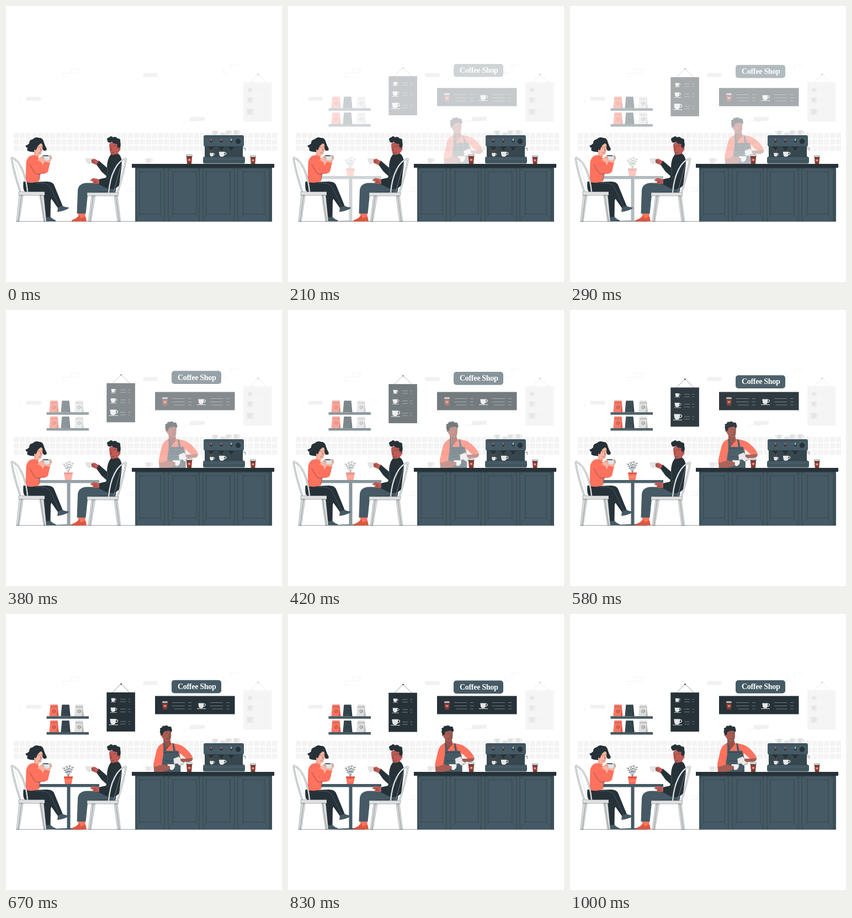
Write an HTML page that moves like this. It is 500 px wide and 500 px high and loops after 1040 ms.

```html
<!DOCTYPE html>
<html lang="en">
<head>
<meta charset="utf-8">
<title>Coffee shop</title>
<style>
html, body { margin: 0; width: 100%; height: 100%; overflow: hidden; background: #fff; }
svg { display: block; width: 100vw; height: 100vh; }
.line { fill: none; stroke: #263238; stroke-width: .5; stroke-linecap: round; stroke-linejoin: round; }
.faint { fill: none; stroke: #ebebeb; stroke-width: .6; }
.dark { fill: #263238; } .slate { fill: #455a64; } .coral { fill: #ff725e; }
.pale { fill: #f4f4f4; } .cup { fill: #e6e6e6; }
.chair { fill: #e0e0e0; stroke: #455a64; stroke-width: .4; stroke-linejoin: round; }
</style>
</head>
<body>
<svg viewBox="0 0 500 500">
  <defs>
    <g id="mug">
      <path d="M-5-4H4L3.3 1.5Q2.5 4-.5 4Q-3.4 4-4.2 1.5Z"/>
      <path d="M3.6-2.8Q7-3.2 6.3-.6Q5.6 1.3 3 1.2" fill="none" stroke="currentColor" stroke-width="1"/>
    </g>
    <g id="takeaway">
      <path d="M-5.2-6H5.2L3.9 8.5H-3.9Z" fill="#7d3b34"/>
      <path d="M-4.7-1.5H4.7L4.2 4H-4.2Z" fill="#a9493d"/>
      <circle cy="1.2" r="1.5" fill="#e8c8bd"/>
      <path d="M-5-8.4H4.7L5.8-5.4H-6Z" fill="#e6e6e6" stroke="#455a64" stroke-width=".5"/>
    </g>
    <g id="bag">
      <path d="M-6.6-21H6.6L7-17L8.6 0H-8.6L-7-17Z"/>
      <path d="M5.6-16.5L8.6 0H4.6Z" fill="#000" opacity=".16"/>
      <path d="M-7-17H7" stroke="#263238" stroke-width=".4"/>
      <circle cy="-9" r="2.7" class="line"/>
      <path d="M-.8-8L.8-10" class="line"/>
    </g>
    <path id="rope" d="M-15.5 15.5L0 0L15.5 15.5" fill="none"/>
  </defs>

  <g id="tiles" class="pale"></g>
  <g fill="#f1f1f1">
    <rect x="37" y="164.500" width="26.500" height="7" rx="2"/>
    <rect x="248.500" y="121.500" width="26" height="7" rx="2"/>
    <rect x="333" y="201" width="27" height="7" rx="2"/>
  </g>
  <path class="faint" d="M130 118V121.500H103.500V128H112M117 121V114H133V118M26.500 176V171H30M406 115V107H422M400 121.500H392.500V114.500H396M322 214V208.500H348M217 336H231V330H220"/>

  <g>
    <use href="#rope" x="457" y="123.500" stroke="#e4e4e4" stroke-width=".7"/>
    <circle cx="457" cy="124" r="1.400" fill="#ccc"/>
    <rect x="430" y="138" width="51.500" height="71.500" fill="#f5f5f5"/>
    <g fill="#e6e6e6" color="#e6e6e6">
      <use href="#mug" transform="translate(442 152.500) scale(.8)"/>
      <use href="#mug" transform="translate(442 170)"/>
      <use href="#mug" transform="translate(442 191.500) scale(1.200)"/>
      <path d="M436 174.500H448V175.300H436ZM434 196H451V197H434Z"/>
    </g>
    <path stroke="#efefef" stroke-width=".6" d="M455 150H465M455 155H465M469 150H472M455 168H465M455 173H465M469 173H472M455 188H465M455 193H465M469 193H472"/>
  </g>

  <path class="line" d="M19 390.300H482" stroke-width=".8"/>

  <g class="fade" data-y="1">
    <use href="#rope" x="208.500" y="126.700" class="line"/>
    <circle cx="208.500" cy="127.200" r="1.200" class="dark"/>
    <rect x="182.300" y="142.200" width="51.600" height="70.900" class="dark"/>
    <g class="cup" color="#e6e6e6">
      <use href="#mug" transform="translate(194.500 156) scale(.8)"/>
      <use href="#mug" transform="translate(194.500 173.800)"/>
      <use href="#mug" transform="translate(194.500 195.300) scale(1.250)"/>
      <path d="M190 159.400H199V160.100H190ZM188.500 178.200H201V179H188.500ZM186.500 200.500H203V201.500H186.500Z"/>
    </g>
    <path stroke="#a5adb0" stroke-width=".6" d="M207 154.500H217M207 159H217M221.500 154.500H225M222 159H225M207 172.500H217M207 177.500H217M221.500 172.500H225M222 177.500H225M207 195H217M207 199.500H217M221.500 195H225M222 199.500H225"/>
  </g>

  <g class="fade">
    <g id="bags"></g>
    <path class="slate" d="M73.500 185.300H150V189.700H73.500ZM73.500 214H150V218.400H73.500Z"/>
    <rect x="270" y="148.500" width="144.500" height="33" class="dark"/>
    <use href="#takeaway" transform="translate(288 165.700) scale(.9)"/>
    <g class="cup" color="#e6e6e6"><use href="#mug" transform="translate(354 166) scale(1.150)"/><path d="M346 171H362V172H346Z"/></g>
    <path stroke="#a5adb0" stroke-width=".6" d="M301 160.500H324M301 166.500H324M304 172H324M330 160.500H336M330 166.500H336M330 172H336M370 160.500H393M370 166.500H393M373 172H393M399 160.500H405M399 166.500H405M399 172H405"/>
  </g>

  <g class="fade" data-y="1">
    <rect x="300" y="120" width="90" height="23.700" rx="5" class="slate"/>
    <text x="345.700" y="136.300" text-anchor="middle" font-family="'Liberation Serif', serif" font-weight="bold" font-size="14" letter-spacing="-.3" fill="#fff">Coffee Shop</text>
  </g>

  <g class="fade" id="barista" data-x="-1">
    <path class="coral" d="M284 234Q276 237 273 246L267 272L270 286H316L315 252L327 263L338 259Q330 246 319 239Q314 236 301 234Z"/>
    <path fill="#95524a" d="M285 223V237L290 246L299 236L297 226Z"/>
    <path fill="#a65d53" d="M281 212Q283 206 292 207L299 211V220Q299 231 293 231Q286 231 282 222Q277 219 281 215Z"/>
    <path class="dark" d="M281 219Q277 213 279.500 210Q277 206 282 206Q283 201 287 203Q291 200 294 204Q300 203 299.500 207Q302 211 299 214Q295 210 291 212Q287 212 285 214L284 219Z"/>
    <path class="line" d="M290 216L292 215.500M296 216H298M295 218L296.500 223L294 223.500M290 226Q293 228 296 226"/>
    <path class="line" d="M283 252L281 268M284 234L289 246L293 241"/>
    <path class="slate" d="M285 234L287 234L290 248H303L301 234L304 235L307 248H312Q313 256 316 262V287H282V264Q285 258 285 248Z"/>
    <path class="line" d="M285 251H312M288 266H309"/>
    <path fill="#a65d53" d="M267 274L283 272L292 275L297 280L291 284L281 286H268Z"/>
    <path class="coral" d="M273 246L267 272L269 277L282 273L285 252Z"/>
    <path fill="#f1f1f1" stroke="#455a64" stroke-width=".4" d="M292 272H306Q307 281 300 283Q293 281 292 272Z"/>
    <path fill="#a65d53" d="M282 276L291 274L297 276L297 281L288 284Z"/>
    <path fill="#e8e8e8" stroke="#455a64" stroke-width=".5" d="M303 262L313 258L322 268L315 275L310 271L304 272Z"/>
    <path fill="#a65d53" d="M316 262L326 262L338 260Q339 267 331 268L320 268L316 266Z"/>
    <path class="line" d="M319 267Q325 269 321 272L317 273"/>
  </g>

  <g id="machine">
    <g fill="#e2e2e2" color="#d8d8d8">
      <use href="#mug" transform="translate(379 230) scale(-1 1)"/><use href="#mug" transform="translate(393 232) scale(.9 .7)"/>
      <use href="#mug" transform="translate(403 229.500)"/><use href="#mug" transform="translate(417 229.500) scale(1.050)"/>
    </g>
    <rect x="360" y="250" width="69" height="25" fill="#37474f"/>
    <rect x="358" y="234" width="73" height="20.500" rx="3" class="slate"/>
    <path class="line" d="M360 237H429M360 254.500H430"/>
    <g id="dials"></g>
    <circle cx="420.500" cy="245.300" r="4.700" class="dark"/>
    <path class="line" d="M428 257.500H433.500V262" stroke-width="1"/>
    <rect x="357" y="273" width="76" height="12.500" rx="3" class="slate"/>
    <path class="line" d="M357.500 281H432M361 273H430"/>
    <g class="cup" color="#e6e6e6"><use href="#mug" transform="translate(373 269.500) scale(.8)"/><use href="#mug" transform="translate(391.500 268.500) scale(1.150)"/></g>
  </g>
  <g fill="#e8e8e8" color="#dcdcdc"><use href="#mug" transform="translate(258 280.500) scale(1.150)"/></g>
  <use href="#takeaway" x="332" y="277.500"/>
  <use href="#takeaway" transform="translate(447.500 278.500) scale(.93)"/>

  <g id="counter">
    <rect x="234" y="292" width="248" height="98.500" class="slate"/>
    <path fill="#37474f" d="M234 293H482V294.500H234Z"/>
    <path fill="#3e515a" d="M477 294H482V390H477Z"/>
    <g id="panels" class="line"></g>
    <rect x="228" y="286" width="258" height="7" class="dark"/>
  </g>

  <g class="fade">
    <path class="slate" d="M110.500 312H116.500V388L139 389V390.500H88V389L110.500 388ZM58.500 308H169V313.500H58.500Z"/>
    <g id="plant" class="line"></g>
    <path class="coral" d="M105 294.500H121L118.500 308H107Z"/>
    <path fill="#d9523f" d="M105 294.500H121L120.500 297.500H105.500Z"/>
    <path class="line" d="M109 302H117" style="stroke:#ffc9c1"/>
  </g>

  <g id="woman">
    <path class="dark" d="M60 330L66 340L72.500 384L80.500 383L81 352L88 340Z"/>
    <path class="slate" d="M72 383L80.500 382Q84 386 90 388V390H72.500Z"/>
    <path class="dark" d="M31.500 318Q30 336 36 337L70 338Q76 339 80 346L94 366L103 363L87 324Q84 318 74 318L48 319Z"/>
    <path class="line" style="stroke:#607d8b" d="M54 321Q76 318 81 330L97 363"/>
    <path class="slate" d="M94 365L102 362Q108 365 114 365L113 367Q104 372 93 373Z"/>
    <path class="dark" d="M60 239Q53 236 49 241Q41 243 42 249Q39 252 35 253Q36 256 39 257Q36 263 45 264L54 265L61 251L68 262Q76 263 73 257Q71 254 69 248Q67 238 60 239Z"/>
    <path fill="#f2a48f" d="M51 260V271L58 275L61 268Z"/>
    <path class="coral" d="M50 270Q38 271 36.500 284L35.500 319Q50 322 60 317L62 304Q73 305 76 300L80 283L70 281L66 288L58 273Z"/>
    <path class="line" d="M43 287L51 301Q57 307 63 304M62 303L60 315"/>
    <path fill="#f9b4a0" d="M52 254L62 247L66 251Q67 264 64 268Q60 273 53 268Z"/>
    <path class="dark" d="M53 261Q49 252 55 247Q59 244 65 248Q57 251 54.500 261Z"/>
    <path class="line" d="M57 256L60 255M64 255L66 255.500M62 257L64 262L62 262.500M59 266L62 266"/>
    <path fill="#f9b4a0" d="M62 279L68 272L78 271L82 270L83.500 276L79 284L70 282L66 286Z"/>
    <path fill="#e0e4e5" stroke="#90a4ae" stroke-width=".4" d="M66 271H81L79 279Q73 282 69 278Z"/>
    <path class="dark" d="M67 270.500H77V272H67Z"/>
    <path fill="#f9b4a0" d="M54 282L64 272L68 273L69 279L65 284L58 287Z"/>
    <path class="line" d="M65 273L69 276M79 272L82 276"/>
    <path class="coral" d="M52 283L58 279L66 285L62 301L56 303L48 290Z"/>
  </g>
  <g id="womanChair">
    <path class="chair" d="M24 343H31L24 390H19ZM61 343H68.500L73 390H68ZM23 336.500H70V343H23Z"/>
    <path class="line" d="M28 343L22 390M63 343L70 390"/>
    <g class="back"><path d="M10 274Q13 298 26 336.500M10 274C25 280 36 304 39 336.500"/></g>
    <path class="line" style="stroke:#c4cacc" d="M17 282L31 336"/>
  </g>

  <g id="man">
    <path class="coral" d="M131 373H144L143 386H131Z"/>
    <path fill="#e0553f" d="M119 388Q130 384 132 379L136 385L144 381L146 390H119Z"/>
    <path class="slate" d="M198 321L147 320.500Q131 321 130 334L128.500 376H144.500L148 342H196Q202 333 198 321Z"/>
    <path class="line" d="M148 342L151 338L190 336"/>
    <path fill="#a94d49" d="M189 259H203V273H190Z"/>
    <path class="dark" d="M190 269L204 268Q210 273 210 286L205 325Q196 335 182 330L168 323L168 314L181 311L182 308L173 300L163 286L168 280L183 293Q183 277 190 269Z"/>
    <path class="line" style="stroke:#607d8b" d="M184 294V306M183 313L196 303L201 288"/>
    <path fill="#c05b55" d="M187 251Q188 246 198 247L206 250Q208 258 205 264Q199 271 191 269Q187 264 187 251Z"/>
    <path class="dark" d="M203 258Q200 252 202 250Q194 250 192 246Q186 250 184 245Q181 239 187 238Q190 234 194 238Q199 235 202 240Q208 239 207 246Q209 252 206 259Z"/>
    <circle cx="205" cy="259" r="2.500" fill="#c05b55"/>
    <path class="line" d="M188 254L190 253.500M195 253H199M192 255L189.500 261L192 261.500M191 266Q193 267 196 265M204 258L206 260"/>
    <path fill="#e3e3e3" d="M144 276H157L155.500 284Q153 287 149 286Q145 284 144 276Z"/>
    <path fill="#c05b55" d="M155 278L160 276.500L168 281L164 288L159 286L155 284Z"/>
    <path class="line" d="M155 280L160 281M156 283L160 284"/>
    <path fill="#c05b55" d="M152 316L158 311.500L169 314L169 322L155 322L159 318Z"/>
    <path class="line" d="M155 318L162 317M158 320L164 319"/>
  </g>
  <g id="manChair">
    <path class="chair" d="M155 344H161.500L154 390H149ZM196 344H202L207.500 390H202ZM147 338H203.500V344H147Z"/>
    <path class="line" d="M158 344L152 390M199 344L205 390"/>
    <g class="back"><path d="M217.500 276Q213 304 202 338M217.500 276C201 281 189 304 186 338"/></g>
    <path class="line" style="stroke:#c4cacc" d="M210 283L195 337"/>
  </g>
</svg>
<script>
const $ = id => document.getElementById(id);
const repeat = (count, draw) => Array.from({ length: count }, (_, i) => draw(i)).join('');

$('tiles').innerHTML = repeat(132, i =>
  `<rect x="${14 + i % 44 * 10.88}" y="${230 + Math.floor(i / 44) * 11.6}" width="9.4" height="9.4" rx=".8"/>`);

const bagColors = ['#ff725e', '#37474f', '#dedede'];
$('bags').innerHTML = repeat(6, i =>
  `<use href="#bag" x="${[87, 108, 132.6][i % 3]}" y="${i < 3 ? 185.3 : 214}" fill="${bagColors[i % 3]}"/>`);

$('dials').innerHTML = repeat(3, i => {
  const x = 372 + i * 18;
  return `<circle cx="${x}" cy="245" r="2.2" class="dark"/>
    <path d="M${x - .8} 240.5h1.600v4h-1.600z" fill="${i < 2 ? '#d56858' : '#cfd8dc'}"/>
    <path class="dark" d="M${x - 5} 255h10l-1 3h-2v3h-4v-3h-2z"/>
    ${i ? '' : `<path d="M${x - 2} 260v5M${x + 2} 260v5" stroke="#a9493d" stroke-width=".8"/>`}`;
});

// Outer left/right, then inset left/right of each cabinet door
const doors = [[236, 287, 242, 280], [294, 350, 303, 345], [357, 414, 363, 406], [420, 477, 430, 468]];
$('panels').innerHTML = doors.map(([a, b, c, d]) =>
  `<path d="M${a} 294V389M${b} 294V389M${c} 300H${d}V377H${c}Z"/>
   <path d="M${a} 294L${c} 300M${b} 294L${d} 300M${a} 389L${c} 377M${b} 389L${d} 377" opacity=".6"/>`).join('');

// Stems fan out from the pot, each with small leaves near its tip
$('plant').innerHTML = repeat(4, i => {
  const tipX = 105 + i * 5.2, tipY = 274 + Math.abs(i - 1.8) * 2.6;
  return `<path d="M113 295L${tipX} ${tipY}"/>` + repeat(3, k => {
    const s = k * .24, x = tipX + (113 - tipX) * s, y = tipY + (294 - tipY) * s;
    return [-1, 1].map(side => `<ellipse cx="${x + side * 1.6}" cy="${y}" rx=".5" ry="1.3"
      class="slate" stroke="none" transform="rotate(${side * 30} ${x} ${y})"/>`).join('');
  });
});

for (const back of document.querySelectorAll('.back')) {
  const d = back.firstElementChild.getAttribute('d');
  back.innerHTML = [['#607078', 2.8], ['#e6e6e6', 2]].map(([color, width]) =>
    `<path d="${d}" fill="none" stroke="${color}" stroke-width="${width}" stroke-linejoin="round"/>`).join('');
}

const LOOP = 1040, STEP = 1000 / 24;
const slideKeys = [[1, -18.7], [7, -13.3], [9, -9.7], [12, -4.6], [14, -1.8], [16, -.2], [19, .6], [22, .3], [24, 0]];
const fading = [...document.querySelectorAll('.fade')];

function slideAt(step) {
  const i = slideKeys.findIndex(key => key[0] >= step);
  if (i < 1) return slideKeys[0][1];
  const [a, from] = slideKeys[i - 1], [b, to] = slideKeys[i];
  return from + (to - from) * (step - a) / (b - a);
}

function render(time) {
  const step = Math.min(24, Math.floor((time % LOOP + 5) / STEP));
  const opacity = step < 2 ? 0 : Math.min(1, (step - 1.8) / 12.8);
  const slide = slideAt(step);
  for (const el of fading) {
    el.setAttribute('opacity', opacity);
    el.setAttribute('transform', `translate(${slide * (el.dataset.x || 0)} ${slide * (el.dataset.y || 0)})`);
  }
}

const start = performance.now();
function tick() {
  render(performance.now() - start);
  requestAnimationFrame(tick);
}
tick();
</script>
</body>
</html>
```
